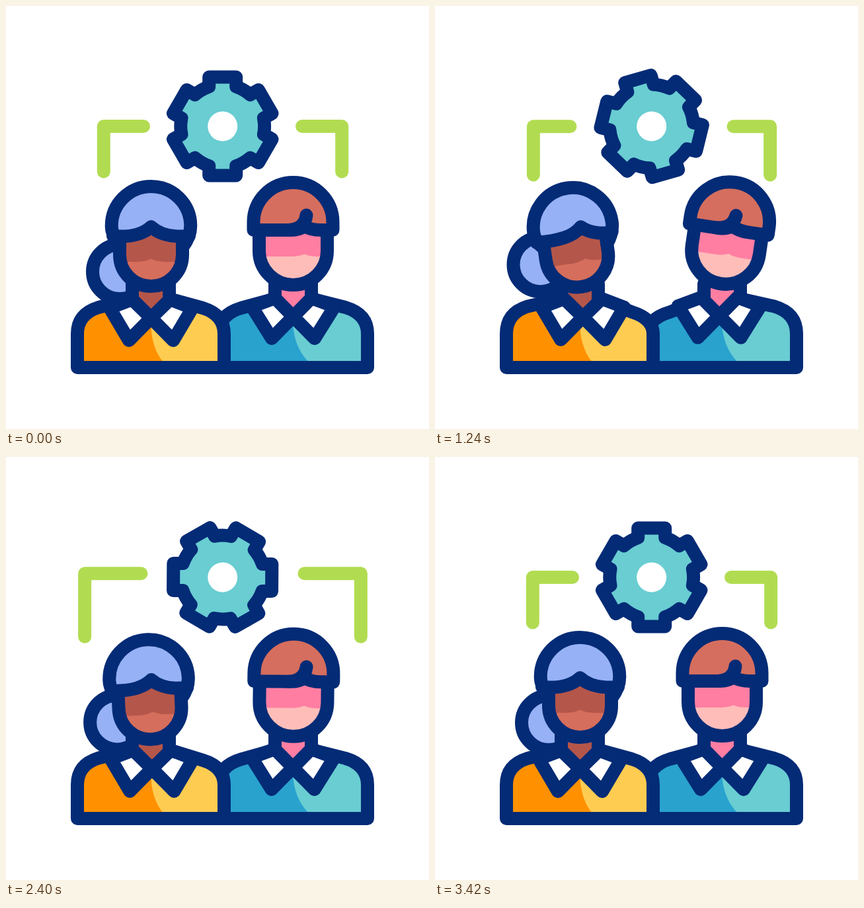
These frames come from a looping animation (640 px wide and 640 px high, 3.6 s). An HTML page:

```html
<!DOCTYPE html>
<html lang="en">
<head>
<meta charset="utf-8">
<title>Team gear</title>
<style>
  html, body { margin: 0; width: 100%; height: 100%; overflow: hidden; background: #fff; }
  svg { display: block; width: 100vw; height: 100vh; }
  .ink, .bracket { stroke: #042b76; stroke-width: 20; stroke-linecap: round; stroke-linejoin: round; fill: none; }
  .bracket { stroke: #b1dc51; }
</style>
</head>
<body>
<svg viewBox="0 0 640 640">
  <path id="bracketL" class="bracket"/>
  <path id="bracketR" class="bracket"/>

  <g id="gear">
    <path id="cog" class="ink" style="fill:#69cdd2"/>
    <circle r="22.5" fill="#fff"/>
  </g>

  <!-- man -->
  <path fill="#29a2ce" d="M322 547V496Q322 469 355 459L407 443H462L514 456Q547 465 547 496V547Z"/>
  <path fill="#69cdd2" d="M434.500 460V484C436 508 446 527 457.500 538V547H547V496Q547 465 514 456L462 443Z"/>
  <path fill="#ff7ea2" d="M407 420H462V442L434.500 470L407 442Z"/>
  <path id="manBody" class="ink"/>
  <g id="manCollar" class="ink">
    <path fill="#fff" d="M372 455L407 442L434.500 470L402 503Z"/>
    <path fill="#fff" d="M497 455L462 442L434.500 470L467 503Z"/>
  </g>
  <g id="manHead">
    <path fill="#ffbdb9" d="M383 339V370.500A51.500 51.500 0 0 0 486 370.500V339Z"/>
    <path id="manShade" fill="#ff7ea2"/>
    <path class="ink" d="M383 339V370.500A51.500 51.500 0 0 0 486 370.500V339"/>
    <path id="manHair" class="ink" style="fill:#d56e5e"/>
    <path id="manTuft" class="ink" d="M428 339C443 338 453 331 454.500 316.500"/>
  </g>

  <!-- woman -->
  <circle id="bun" class="ink" style="fill:#96b1f5" cx="172" cy="402" r="41"/>
  <path fill="#ff9100" d="M108 547V496Q108 466 140 456L191 443H248L299 459Q330 469 330 496V547Z"/>
  <path fill="#ffcc52" d="M219.500 460V484C220 508 228 527 237.500 538V547H330V496Q330 469 299 459L248 443Z"/>
  <path fill="#b5564a" d="M191 420H248V444L219.500 472L191 444Z"/>
  <path id="womanBody" class="ink"/>
  <g id="womanCollar" class="ink">
    <path fill="#fff" d="M157 457L191 444L219.500 472L186 506Z"/>
    <path fill="#fff" d="M282 457L248 444L219.500 472L253 506Z"/>
  </g>
  <g id="womanHead">
    <path fill="#d56e5c" d="M172 345V376.500A47.500 47.500 0 0 0 267 376.500V345Z"/>
    <path id="womanShade" fill="#b5564a"/>
    <path class="ink" d="M172 350V376.500A47.500 47.500 0 0 0 267 376.500V350"/>
    <path id="womanHair" fill="#96b1f5"/>
    <path class="ink" d="M172 358C163 350 159.700 342 159.700 332.700A59.800 59.800 0 0 1 279.300 332.700C279.300 345 274 356 267 365"/>
    <path id="womanFringe" class="ink"/>
  </g>
</svg>
<script>
const LOOP = 3600, BEGIN = 100, END = 3420;
const $ = id => document.getElementById(id);
const set = (id, name, value) => $(id).setAttribute(name, value);

const part = (t, from, to) => Math.min(1, Math.max(0, (t - from) / (to - from)));
const smooth = (t, from, to) => (1 - Math.cos(Math.PI * part(t, from, to))) / 2;
const brisk = (t, from, to) => Math.sin(Math.PI / 2 * part(t, from, to)) ** 1.3;

// Steady turn of seven teeth that brakes before it stops.
function spin(t) {
  const stop = 3250, brake = 450;
  const speed = 420 / (stop - BEGIN - brake / 2);
  const b = part(t, stop - brake, stop);
  return speed * (Math.min(t, stop) - BEGIN - brake * b * b / 2) * (t > BEGIN);
}

function cogPath() {
  const tooth = [[-20.5, -60], [-20.5, -74.5], [20.5, -74.5], [20.5, -60]];
  let d = "";
  for (let i = 0; i < 6; i++) {
    const a = i * Math.PI / 3, c = Math.cos(a), s = Math.sin(a);
    tooth.forEach(([x, y], j) => {
      const cmd = j ? "L" : i ? "A63 63 0 0 1 " : "M";
      d += cmd + (x * c - y * s).toFixed(2) + " " + (x * s + y * c).toFixed(2);
    });
  }
  return d + "A63 63 0 0 1 -20.5 -60Z";
}

// Pull in a little, stretch out, then settle.
function drawBrackets(t) {
  const pull = 10 * brisk(t, BEGIN, 620) - 40 * smooth(t, 600, 2640) + 30 * smooth(t, 2640, END);
  const arm = 3.5 * (smooth(t, BEGIN, 900) - smooth(t, 2500, END));
  const y = 182 + .2 * pull, foot = 250.5 - .55 * pull + 1.6 * arm;
  for (const [id, side] of [["bracketL", -1], ["bracketR", 1]]) {
    const corner = 328 + side * (180.2 - pull);
    set(id, "d", `M${328 + side * (120 + arm)} ${y}H${corner}V${foot}`);
  }
}

// Shoulder next to the other person sinks while the head leans away.
function drawBody(id, cx, half, neck, side, p) {
  const inner = 1 + 6 * p, outer = -1.5 * p;
  const [l, r] = side < 0 ? [outer, inner] : [inner, outer];
  set(id, "d", `M${cx - neck} 420V443L${cx - 79} ${456 + l}Q${cx - half} ${466 + l} ${cx - half} 496V547`
    + `H${cx + half}V496Q${cx + half} ${466 + r} ${cx + 79} ${456 + r}L${cx + neck} 443V420`);
}

const dip = (p, settle) => settle * p + 13 * p * (1 - p);

function lean(name, side, p, x, y, settle) {
  set(name + "Head", "transform", `translate(${side * p} ${dip(p, settle)}) rotate(${side * 8.3 * p} ${x} ${y})`);
  set(name + "Collar", "transform", `translate(${-side * 4.3 * p} ${-1.2 * p})`);
}

// Fringe and its shadow slide across the face as the head turns.
function drawWoman(p) {
  const x = 219.5 + 12 * p;
  const fringe = `C${x - 35} 350 ${x - 14} 347 ${x} 334C${x + 14} 347 ${x + 35} 350 `;
  lean("woman", -1, p, 219.5, 402, 1.2);
  drawBody("womanBody", 219, 111, 28, -1, p);
  set("womanFringe", "d", `M162 348${fringe}277 348`);
  set("womanHair", "d", `M160 348${fringe}279 348V332.5A59.5 59.5 0 0 0 160 332.5Z`);
  set("womanShade", "d", `M172 345V387H${x - 28}Q${x - 11} 388 ${x} 382.5Q${x + 11} 388 ${x + 28} 387H267V345Z`);
  set("bun", "transform", `translate(${-12.5 * p} ${dip(p, -10.8)})`);
}

function drawMan(p) {
  const x = 452 - 12 * p;
  lean("man", 1, p, 434.5, 400, -1.5);
  drawBody("manBody", 434.5, 112.5, 27.5, 1, p);
  set("manHair", "d", `M374.5 339V327A60 60 0 0 1 494.5 327V339H${x + 24}Q${x + 9} 339 ${x} 333Q${x - 9} 339 ${x - 20} 339Z`);
  set("manShade", "d", `M383 339H486V379H${x + 20}Q${x + 7} 379 ${x} 375.5Q${x - 9} 379 ${x - 18} 379H383Z`);
  set("manTuft", "transform", `translate(${-12 * p} 0)`);
}

function draw(t) {
  set("gear", "transform", `translate(327.7 182) rotate(${spin(t)})`);
  drawBrackets(t);
  const out = brisk(t, BEGIN, 1100);
  drawWoman(out - brisk(t, 1740, 2960));
  drawMan(out - brisk(t, 1740, 2590));
}

function loop() {
  draw((performance.now() - start) % LOOP);
  requestAnimationFrame(loop);
}

set("cog", "d", cogPath());
const start = performance.now();
loop();
</script>
</body>
</html>
```
